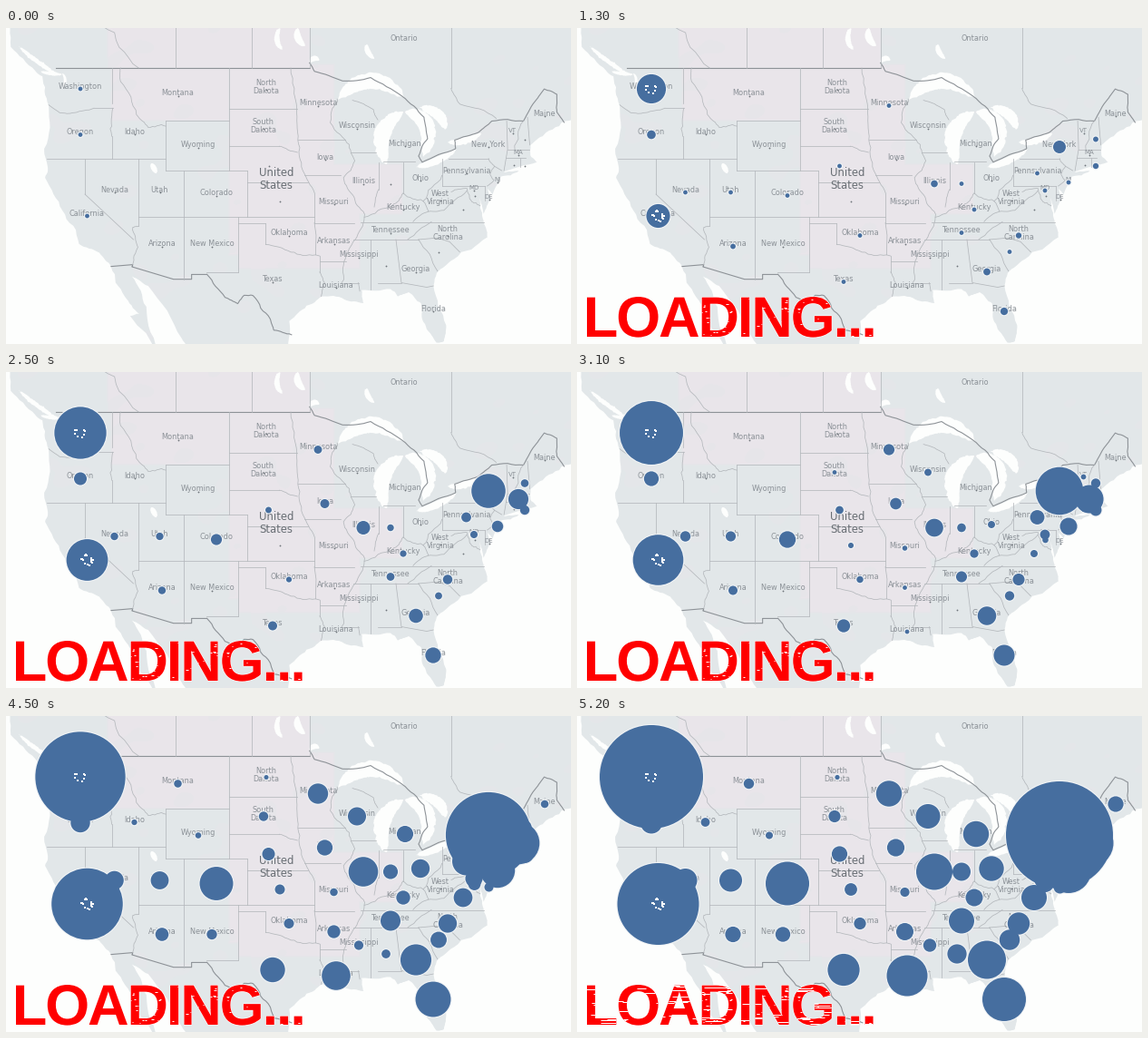
Write a matplotlib script that moves like this. It is 623 px wide and 348 px high and loops after 5.3 s.

```python
import numpy as np
import matplotlib.pyplot as plt
from matplotlib.animation import FuncAnimation
from matplotlib.patches import PathPatch, Polygon
from matplotlib.path import Path
from matplotlib.textpath import TextPath
from matplotlib.transforms import Affine2D

W, H, DPI = 623, 348, 64
PT = 72 / DPI                      # points per pixel
FRAMES, STEP, LAST = 53, 0.1, 5.2  # seconds

WATER, LAND, PRAIRIE = "#fdfefd", (226, 231, 233), (233, 229, 234)
BORDER, COUNTRY, INK = "#b3b7bb", "#8d9297", "#8b9197"
BLUE, RED = "#466e9f", "#ff0000"

rng = np.random.default_rng(4)
fig = plt.figure(figsize=(W / DPI, H / DPI), dpi=DPI, facecolor=WATER)
ax = fig.add_axes([0, 0, 1, 1])


# ---- geometry helpers ----
def project(flat):
    """Flat lon, lat, lon, lat ... to Mercator pixels."""
    lon, lat = np.reshape(flat, (-1, 2)).T
    merc = np.log(np.tan(np.pi / 4 + np.radians(lat) / 2))
    return np.column_stack([1283.4 + 9.97 * lon, 44 + 571 * (0.9838 - merc)])


def roughen(p, amount, levels=3):
    """Midpoint displacement: each segment gets a random kink."""
    for _ in range(levels):
        d = np.diff(p, axis=0)
        kink = rng.normal(0, amount, (len(d), 1)) * d[:, ::-1] * [-1, 1]
        out = np.empty((2 * len(p) - 1, 2))
        out[::2], out[1::2] = p, (p[:-1] + p[1:]) / 2 + kink
        p = out
    return p


def border(*flat, rough=0.0, color=BORDER, width=0.75):
    x, y = roughen(project(flat), rough).T
    ax.plot(x, y, color=color, lw=width * PT, zorder=4)


def lake(x0, y0, bx, by, x1, y1, half):
    """Water swelling to a half width along a bent spine, in pixels."""
    u = np.linspace(0, 1, 14)[:, None]
    a, b, c = np.array([(x0, y0), (bx, by), (x1, y1)])
    spine = (1 - u) ** 2 * a + 2 * u * (1 - u) * b + u ** 2 * c
    slope = 2 * (1 - u) * (b - a) + 2 * u * (c - b)
    normal = slope[:, ::-1] * [-1, 1] / np.hypot(*slope.T)[:, None]
    swell = half * np.sqrt(np.sin(np.pi * u).clip(0)) * normal
    shore = np.vstack([spine + swell, (spine - swell)[::-1]])
    ax.add_patch(Polygon(roughen(shore, 0.1, 2), fc=WATER, ec="none", zorder=3))


# ---- land and water ----
pacific = [
    -128.6, 53, -128.2, 50.5, -125.5, 48.8, -124.7, 48.4, -124, 46.2,
    -124.5, 42.8, -124.1, 41, -124.4, 40.4, -122.5, 37.6, -120.65, 34.6,
    -118.4, 33.8, -117.1, 32.5, -115.6, 29.7, -114, 28, -115, 27.8,
    -112.1, 24, -111.3, 24, -113.2, 28.7, -114.8, 31.6, -113, 30.7,
    -109.3, 25.6, -108, 24]
gulf = [
    -97.6, 24, -97.4, 27.3, -95.5, 28.8, -93.8, 29.7, -91.3, 29.4, -89.2, 29.05,
    -89.4, 30.3, -86.2, 30.4, -85.4, 29.7, -84.2, 30.1, -82.8, 29, -82.75, 28,
    -81.8, 26.1, -81.1, 25.15]
atlantic = [
    -80.3, 25.3, -80.05, 26.9, -81.45, 30.7, -81.1, 31.9, -79.2, 33.2, -75.5, 35.2,
    -76, 36.9, -76.4, 38.8, -75.9, 37.3, -75.1, 38.6, -75.5, 39.5, -74.9, 39,
    -74, 40.5, -72, 41, -73.7, 40.9, -70, 41.7, -70.7, 42.2, -70.7, 43.1,
    -69, 44.1, -66.1, 45.1, -65, 45.4, -65, 53]
coast = roughen(project(pacific + gulf + atlantic), 0.05)
land = Polygon(coast, fc="none", ec="none")
ax.add_patch(land)

# Land tint: soft prairie blocks plus a mottled ripple
px, py = np.meshgrid(np.arange(W) + 0.5, np.arange(H) + 0.5)


def block(x0, x1, y0, y1):
    edge = np.minimum(np.minimum(px - x0, x1 - px), np.minimum(py - y0, y1 - py))
    return np.clip(edge / 3 + 0.5, 0, 1)


tint = np.maximum.reduce([block(112, 335, -9, 44), block(116, 246, 44, 102),
                          block(246, 362, 40, 250), block(256, 390, 200, 265),
                          block(360, 437, 150, 205)])
ripple = sum(np.sin(kx * px + ky * py + phase)
             for kx, ky, phase in rng.normal(0, 0.09, (14, 3)) * [1, 1, 40])
tint = np.clip(tint + 0.35 * (ripple > 4) - 0.35 * (ripple < -4), 0, 1)[..., None]
shade = np.array(LAND) * (1 - tint) + np.array(PRAIRIE) * tint
ground = ax.imshow(shade / 255, extent=(0, W, H, 0), aspect="auto", zorder=0)
ground.set_clip_path(land)
ax.set_xlim(0, W)
ax.set_ylim(H, 0)
ax.axis("off")

lake(366, 79, 402, 38, 440, 78, 9)        # Superior
lake(420, 150, 402, 112, 438, 92, 9)      # Michigan
lake(406, 120, 408, 110, 416, 102, 2)
lake(440, 92, 478, 100, 460, 142, 9)      # Huron
lake(456, 88, 482, 90, 484, 112, 6)
lake(452, 153, 474, 150, 497, 133, 4)     # Erie
lake(487, 126, 506, 127, 524, 116, 4)     # Ontario
lake(14, 20, 36, 40, 58, 52, 2.5)         # western sounds
lake(38, 48, 50, 51, 62, 51, 2)
lake(62, 50, 68, 56, 63, 66, 1.5)
lake(302, 0, 294, 14, 305, 24, 3)         # northern lakes
lake(322, 0, 318, 12, 330, 20, 4)
lake(335, 38, 340, 30, 345, 36, 3)
lake(398, 18, 396, 26, 406, 34, 3)
lake(160, 149, 163, 154, 166, 160, 3)

# ---- borders ----
thick = dict(color=COUNTRY, width=1.1)
border(-123.2, 49, -95.15, 49, **thick)
border(-95.15, 49.37, -94.6, 48.75, -91.5, 48.05, -88.4, 48.3, -84.9, 46.9,
       -82.5, 45.3, -82.1, 43.6, -83.1, 42.2, -82.7, 41.7, -79, 42.8, -79.1, 43.5,
       -76.5, 44.1, -75, 45, -71.5, 45, -70, 46.7, -69.2, 47.45, -67.8, 47.05,
       -67.8, 45.7, -67, 44.9, rough=0.03, **thick)
border(-117.1, 32.53, -114.7, 32.7, -114.8, 32.5, -110.2, 31.33, -108.2, 31.33,
       -108.2, 31.78, -106.5, 31.78, **thick)
border(-106.5, 31.78, -104.5, 29.6, -103.1, 29, -102.4, 29.8, -101.4, 29.77,
       -99.5, 27.5, -99.1, 26.4, -97.15, 25.95, rough=0.05, **thick)

PARALLELS = [
    (42, -124.2, -111.05), (46, -119, -116.92), (45, -111.05, -104.05),
    (41, -111.05, -102.05), (40, -102.05, -95.3), (37, -114.04, -94.62),
    (36.5, -103, -100), (32, -106.6, -103.06), (45.94, -104.05, -96.56),
    (43, -104.05, -98.5), (43.5, -96.45, -91.2), (40.6, -95.77, -91.7),
    (42.5, -90.65, -87.8), (41.73, -87, -83.45), (36.5, -94.62, -90.2),
    (36.55, -89.5, -75.9), (35, -90.3, -83.1), (33, -94.04, -91.15),
    (31, -91.6, -89.75), (31, -87.6, -85), (39.72, -80.52, -75.8),
    (42, -79.76, -75.35), (42.72, -73.25, -70.9), (42.03, -73.5, -71.3)]
MERIDIANS = [
    (-110, 52, 49), (-101.5, 52, 49), (-95.15, 52, 49), (-79.5, 52, 47.5),
    (-117.04, 49, 46.4), (-117.03, 43.8, 42), (-120, 42, 39), (-114.04, 42, 36.2),
    (-111.05, 45, 41), (-109.05, 41, 31.33), (-104.05, 49, 41), (-102.05, 41, 37),
    (-103.04, 37, 32), (-100, 36.5, 34.56), (-94.62, 39.1, 36.5), (-94.04, 33.5, 32),
    (-87.53, 41.7, 39.4), (-84.8, 41.7, 39.1), (-80.52, 42, 39.72),
    (-88.4, 35, 30.35), (-75.75, 39.72, 38.46), (-71.85, 42.03, 41.3)]
for lat, west, east in PARALLELS:
    border(west, lat, east, lat)
for lon, north, south in MERIDIANS:
    border(lon, north, lon, south)

# Diagonals and rivers
border(-118.2, 52, -114.06, 49, rough=0.08)
border(-79.5, 47.5, -78.5, 46.3, -74.5, 45.2, rough=0.04)
border(-124, 46.25, -122.8, 45.65, -121.2, 45.65, -119, 46, rough=0.03)
border(-116.92, 46, -117.2, 44.4, -117.03, 43.8, rough=0.06)
border(-120, 39, -114.63, 35)
border(-114.04, 36.2, -114.7, 36.1, -114.14, 34.3, -114.72, 32.7, rough=0.06)
border(-116.05, 49, -116.05, 48, -114.3, 45.5, -113, 44.5, -111.05, 44.6, rough=0.08)
border(-100, 34.56, -97.2, 33.85, -94.48, 33.6, rough=0.06)
border(-98.5, 43, -96.5, 42.5, rough=0.06)
border(-97.23, 49, -96.56, 45.94, -96.45, 43.5, -95.9, 41, -94.6, 39.1, rough=0.04)
border(-94.62, 36.5, -94.43, 35.4, -94.48, 33.6, -94.04, 33.5)
border(-94.04, 32, -93.5, 31, -93.85, 29.7, rough=0.05)
border(-92.1, 46.7, -92.8, 45.5, -91.2, 43.5, -90.15, 41.8, -91.4, 40.4, -90.2, 38.7,
       -89.1, 37, -90.1, 35, -91.1, 33.6, -91.6, 31, rough=0.08)
border(-89.75, 31, -89.6, 30.2)
border(-90.4, 46.6, -88.1, 45.9, -87.6, 45.1, rough=0.05)
border(-87.53, 39.4, -88, 37.9, rough=0.08)
border(-89.1, 37, -86, 38, -84.8, 39.1, -82.6, 38.4, -80.52, 40.6, rough=0.08)
border(-83.1, 35, -81.04, 35.15, -79.67, 34.8, -78.55, 33.87)
border(-84.3, 35, -81.68, 36.59, rough=0.05)
border(-85.6, 35, -85, 31, -82.2, 30.57, -81.45, 30.7)
border(-83.1, 35, -81, 32.1, rough=0.05)
border(-83.7, 36.6, -82, 37.5, -82.6, 38.4, rough=0.05)
border(-82, 37.5, -80.3, 37.6, -77.75, 39.3, rough=0.05)
border(-79.48, 39.2, -77.75, 39.5, -77.2, 38.35, -76.3, 38, rough=0.06)
border(-75.35, 42, -74.7, 41.36, -75.2, 40.7, -74.75, 40.2, -75.5, 39.7, rough=0.05)
border(-74.7, 41.36, -73.9, 41)
border(-73.35, 45, -73.25, 42.75, -73.65, 41)
border(-71.5, 45, -72.45, 42.73, rough=0.06)
border(-71.05, 45.3, -70.8, 43.1)

# ---- labels and bubbles ----
FIRST = 2.4  # radius of a bubble when it appears


def label(text, x, y, size=8.1, color=INK):
    ax.text(x, y, text, fontsize=size * PT, color=color, ha="center", va="center",
            family="DejaVu Sans", linespacing=1.05, zorder=5)


# Waves: start time, growth power, then name, centre and final radius
WAVES = [
    (0, 1, [("Washington", 82, 67, 57), ("Oregon", 82, 117.5, 12),
            ("California", 89.5, 207, 45)]),
    (0.4, 1.5, [("New York", 532, 131, 59), ("Illinois", 394, 171.5, 20),
                ("Arizona", 172, 240.5, 8.6), ("Georgia", 452, 268.5, 21),
                ("Florida", 471, 312, 24), ("North\nCarolina", 487, 228.5, 12.2),
                ("", 572, 122.5, 9), ("", 572, 152, 12)]),
    (1.3, 1.5, [("Nevada", 119.5, 181, 13), ("Utah", 169.5, 181, 12.5),
                ("Colorado", 232, 184.5, 24), ("Texas", 294, 279.5, 17.6),
                ("Oklahoma", 312, 228.5, 6.6), ("", 289.5, 152, 8.6),
                ("Minnesota", 344, 85.5, 14.2), ("", 424, 171.5, 10),
                ("Kentucky", 438, 200, 9.5), ("Tennessee", 424, 225.5, 14),
                ("", 477, 246.5, 11.2), ("MD", 516, 179, 12), ("NJ", 542, 170, 25),
                ("Pennsylvania", 507.5, 160, 20)]),
    (1.9, 0.6, [("MA", 565, 140, 26.5), ("Iowa", 351.5, 145, 9.6)]),
    (2.6, 1.2, [("", 302, 191, 6.9), ("Wisconsin", 387, 110.5, 13.5),
                ("Ohio", 457, 168, 13.7), ("Missouri", 361.5, 194, 5.1),
                ("", 504, 200, 14), ("", 516.5, 185, 9), ("", 559.5, 150.5, 12),
                ("VT", 558.5, 115.5, 6)]),
    (3.1, 1, [("Louisiana", 364, 286, 22.5), ("Arkansas", 361.5, 237.5, 9.5),
              ("South\nDakota", 284, 110.5, 6.6)]),
    (3.6, 1, [("New Mexico", 227, 240.5, 8.2), ("North\nDakota", 287, 67.5, 2.6),
              ("Montana", 189.5, 74.5, 5.7), ("Wyoming", 212, 131.5, 4),
              ("Michigan", 440, 130, 14.2), ("Mississippi", 389, 252.5, 7.2),
              ("DE", 532.5, 188.5, 7)]),
    (4.2, 1, [("Idaho", 141.5, 117, 4.9), ("", 419, 262, 10.6),
              ("Maine", 594, 97, 8.6)]),
    (9, 1, [("West\nVirginia", 479, 189.5, 0)]),
]
rows = []
for start, power, states in WAVES:
    for name, x, y, final in states:
        label(name, x, y - 2.7, 7 if len(name) == 2 else 8.1)
        rows.append((x, y, final, start, power))
cx, cy, final, start, power = np.transpose(rows)
label("United\nStates", 298, 166.5, 11.6, "#686e74")
label("Ontario", 439, 12)


def radii(t):
    u = np.clip((t - start) / (LAST - start), 0, 1)
    return np.where(t >= start, FIRST + (final - FIRST) * u ** power, 0)


def dots(color, z, x=cx, y=cy, r=0.0, marker="o"):
    return ax.scatter(x, y, s=(2 * r * PT) ** 2, c=color, lw=0, marker=marker, zorder=z)


dots("#6f757b", 5, r=0.9)
halo = dots("#f1f4f6", 6)
fill = dots(BLUE, 7)


def specks(x, y, n):
    a, r = rng.uniform(0, 2 * np.pi, n), rng.uniform(4, 7, n)
    return dots("white", 8, x + r * np.cos(a), y + r * np.sin(a), 0.55, "s")


grains = [specks(82, 67, 8), specks(89.5, 207, 16)]


# ---- loading caption ----
def tracked(text, size, tracking):
    """Text outline with even letter spacing."""
    font = dict(family="Liberation Sans", weight="bold")
    glyphs = []
    for k, char in enumerate(text):
        glyph = TextPath((0, 0), char, size=size, prop=font)
        prefix = TextPath((0, 0), text[:k + 1], size=size, prop=font)
        shift = prefix.get_extents().x1 - glyph.get_extents().x1 + k * tracking
        glyphs.append(Affine2D().translate(shift, 0).transform_path(glyph))
    return Path.make_compound_path(*glyphs)


word = tracked("LOADING...", 63, -2.1)
place = Affine2D().scale(1, -1).translate(11 - word.get_extents().x0, 340)
caption = PathPatch(place.transform_path(word), fc=RED, ec="none", zorder=10)
outline = PathPatch(caption.get_path(), fc="white", ec="white", lw=1.2 * PT, zorder=9)
ax.add_patch(outline)
ax.add_patch(caption)


def scratches(n, x0, longest):
    """White flecks that show only inside the letters."""
    x, y = rng.uniform(x0, 326, n), np.round(rng.uniform(296, 339, n)) + 0.5
    lines = ax.hlines(y, x, x + rng.uniform(1, longest, n), color="white",
                      lw=PT, zorder=11)
    lines.set_clip_path(caption)
    return lines


overlay = [caption, outline, scratches(90, 135, 3)]
wear = [scratches(24, 5, 28) for _ in range(4)]


def draw(i):
    r = radii(i * STEP)
    fill.set_sizes((2 * r * PT) ** 2)
    halo.set_sizes((2 * np.where(r > 0, r + 1.1, 0) * PT) ** 2)
    for item in overlay:
        item.set_visible(i > 0)
    for g in grains:
        g.set_visible(i > 4)
    for k, w in enumerate(wear):
        w.set_visible(i >= FRAMES - 4 + k)
    return [halo, fill, *overlay, *grains, *wear]


anim = FuncAnimation(fig, draw, frames=FRAMES, interval=round(STEP * 1000),
                     repeat=True, repeat_delay=0, blit=False)
plt.show()
```
